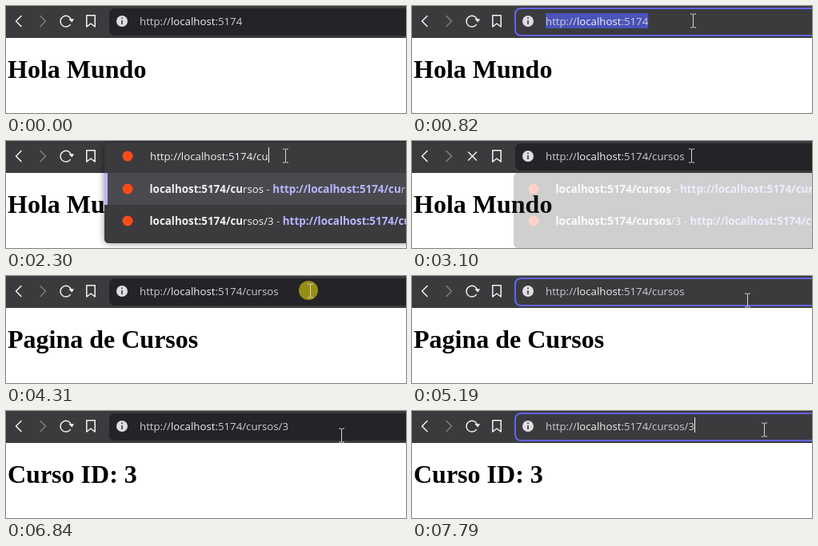
These frames come from a looping animation (500 px wide and 134 px high, 8 s). An HTML page:

```html
<!DOCTYPE html>
<html lang="es">
<head>
<meta charset="utf-8">
<title>Rutas</title>
<style>
  html, body { margin: 0; width: 100%; height: 100%; overflow: hidden; background: #fff; }
  svg { display: block; width: 500px; height: 134px; }
  text { font: 13.25px "Open Sans", "Noto Sans", sans-serif; fill: #f0f0f2; white-space: pre; }
  #title { font: bold 32px "Liberation Serif", Times, serif; fill: #000; }
  .line { fill: none; stroke: #f4f4f6; stroke-width: 1.5; stroke-linecap: round; stroke-linejoin: round; }
  .dim { fill: #cdcdd1; }
  .b { font-weight: 700; font-size: 13.4px; }
  .link { fill: #b9b6ff; }
  .mark { fill: #ff4a1c; }
  #panel { filter: drop-shadow(0 0 4px rgba(0, 0, 0, .45)); }
</style>
</head>
<body>
<svg viewBox="0 0 500 134">
  <text id="title" x="2" y="90"></text>

  <rect width="500" height="40" fill="#3b3b3e"/>
  <path class="line" d="M19 12.5 L12.5 19 L19 25.5"/>
  <path class="line" style="stroke:#8b7d72" d="M43 12.5 L49.5 19 L43 25.5"/>
  <g id="reload">
    <path class="line" d="M81.6 17.5 A6.9 6.9 0 1 0 80.4 23.4"/>
    <path fill="#f4f4f6" d="M78.3 16.2 H85 L82.4 20.4 Z"/>
  </g>
  <path id="stop" class="line" d="M70.5 14 L80.5 24 M80.5 14 L70.5 24"/>
  <path class="line" d="M100.8 11.8 H111.2 V26 L106 22 L100.8 26 Z"/>

  <g id="bar">
    <rect id="field" x="129" y="3" width="390" height="34" rx="7" stroke-width="2"/>
    <circle cx="145" cy="19" r="7" fill="#dedee0"/>
    <path d="M145 18 V23 M145 14.6 V16.2" stroke="#35353a" stroke-width="1.6"/>
    <rect id="select" x="167" y="9" height="19" fill="#4a53b8"/>
    <text id="url" x="167" y="24"></text>
  </g>

  <g id="drop">
    <rect id="panel" width="400" rx="5" fill="#3b3b3e"/>
    <g id="hover">
      <rect x="123" y="40" width="377" height="40" fill="#4a4a4e"/>
      <rect x="123" y="40" width="4" height="40" rx="1" fill="#b9b6ff"/>
    </g>
    <g id="input">
      <circle class="mark" cx="152" cy="19" r="6.5"/>
      <text id="typed" x="180" y="24"></text>
    </g>
    <circle class="mark" cx="152" cy="60" r="6.5"/>
    <text id="row1" x="179.5" y="64.5"></text>
    <circle id="visited" class="mark" cx="152" cy="100" r="6.5"/>
    <path id="lens" class="line" style="stroke:#c8c8cc" d="M153.5 101.5 L157 105 M154.5 98.7 a3.4 3.4 0 1 0 -6.8 0 a3.4 3.4 0 1 0 6.8 0"/>
    <text id="row2" x="179.5" y="104.5"></text>
  </g>

  <rect id="caret" y="8" width="1" height="19" fill="#f4f4f6"/>
  <circle id="pulse" r="12" fill="#fff200"/>
  <g id="mouse">
    <path id="beam" fill="none" stroke="#d6d6d8" d="M-3.5 -8.5 H-1 L0 -7.5 L1 -8.5 H3.5 M-3.5 8.5 H-1 L0 7.5 L1 8.5 H3.5 M0 -7.5 V7.5"/>
    <path id="arrow" fill="#fff" stroke="#000" d="M0 0 V15 L3.5 11.7 L6 17 L8.3 16 L6 11 H10.8 Z"/>
  </g>
</svg>
<script>
const LOOP = 8000;
const HOST = "localhost:5174";
const $ = id => document.getElementById(id);
const el = {};
document.querySelectorAll("[id]").forEach(n => el[n.id] = n);

// Each step list holds [start time, value]; the latest one counts.
const at = (steps, t) => {
  let value = steps[0][1];
  for (const [start, v] of steps) if (t >= start) value = v;
  return value;
};

const titles = [[0, "Hola Mundo"], [3500, "Pagina de Cursos"], [6840, "Curso ID: 3"]];
const paths = [
  [0, ""], [1960, "/"], [2100, "/c"], [2300, "/cu"], [2370, "/cur"], [2510, "/curs"],
  [2640, "/curso"], [2770, "/cursos"], [5450, "/cursos/"], [5910, "/cursos/3"]
];
const panelAlpha = [
  [0, 0], [1960, .5], [2030, 1], [3100, .24], [3170, 0],
  [5450, .6], [5520, 1], [6440, .7], [6510, .24], [6580, 0]
];
const carets = [[0, 0], [1260, 1], [1760, 0], [1960, 1], [3100, 0], [4690, 1], [5190, 0], [5450, 1], [6440, 0], [7720, 1]];
const focus = [[680, 3100], [4380, 6440], [7510, LOOP]];
const selected = [[680, 1260], [4380, 4690], [7510, 7720]];
const typing = [[1960, 3100], [5450, 6440]];
const loading = [[3100, 3500], [6440, 6840]];
const clicks = [610, 1150, 4240, 4480, 7440, 7580];
const moves = [
  [130, 440, 150], [610, 351, 18], [950, 351, 18], [1020, 349, 18], [4030, 349, 18], [4240, 380, 18],
  [4590, 380, 18], [4720, 419, 30], [7370, 419, 30], [7510, 440, 23]
];

const inside = (spans, t) => spans.some(([a, b]) => t >= a && t < b);
const show = (node, on) => node.style.display = on ? "" : "none";
const span = (text, cls) => `<tspan class="${cls}">${text}</tspan>`;

function put(node, html) {
  if (node.markup !== html) node.innerHTML = node.markup = html;
}

function set(node, attrs) {
  for (const name in attrs) node.setAttribute(name, attrs[name]);
}

// The part typed so far is bold.
function suggestion(path, typed) {
  const rest = path.slice(typed.length);
  return span(HOST + typed, "b") + rest + span(" - ", "dim") +
    span("http://" + HOST + typed, "b link") + span(rest, "link");
}

function pointer(t) {
  let i = 0;
  while (i < moves.length - 1 && t >= moves[i + 1][0]) i++;
  const [t0, x0, y0] = moves[i];
  const [t1, x1, y1] = moves[i + 1] || [LOOP, x0, y0];
  const k = Math.max(0, Math.min(1, (t - t0) / (t1 - t0)));
  const e = k * k * (3 - 2 * k);
  return [x0 + (x1 - x0) * e, y0 + (y1 - y0) * e];
}

function drawBar(t, path) {
  const open = inside(typing, t);
  const focused = inside(focus, t);
  put(el.url, span("http://", "dim") + "localhost" + span(":5174" + path, "dim"));
  put(el.typed, "http://" + HOST + path);
  set(el.field, focused
    ? { fill: "#3b3b3e", stroke: "#6664ea" }
    : { fill: "#242328", stroke: "none" });
  show(el.bar, !open);
  show(el.select, inside(selected, t));
  const width = (open ? el.typed : el.url).getComputedTextLength();
  if (!open) set(el.select, { width });
  set(el.caret, { x: Math.round((open ? 180 : 167) + width) });
  show(el.caret, at(carets, t));
}

function drawPanel(t, path) {
  const alpha = at(panelAlpha, t);
  const open = inside(typing, t);
  const search = t >= 5450;
  show(el.drop, alpha > 0);
  el.drop.style.opacity = alpha;
  show(el.input, open);
  show(el.hover, open);
  set(el.panel, open ? { x: 123, y: 2, height: 126 } : { x: 127, y: 40, height: 94 });
  el.panel.style.filter = open ? "" : "none";
  show(el.visited, !search);
  show(el.lens, search);
  put(el.row1, suggestion(search ? "/cursos/3" : "/cursos", path));
  put(el.row2, search
    ? "http://" + HOST + path + span(" - Búsqueda de Tolvia", "dim")
    : suggestion("/cursos/3", path));
}

function drawPointer(t) {
  const [x, y] = pointer(t);
  show(el.mouse, t >= 130);
  set(el.mouse, { transform: `translate(${Math.round(x) + .5} ${Math.round(y) + .5})` });
  show(el.beam, y < 40);
  show(el.arrow, y >= 40);
  const age = Math.min(...clicks.map(c => t >= c ? t - c : LOOP));
  const fade = Math.max(0, Math.min(1, (210 - age) / 110));
  set(el.pulse, { cx: x - 2, cy: y, opacity: .52 * fade });
}

function draw() {
  const t = performance.now() % LOOP;
  const path = at(paths, t);
  put(el.title, at(titles, t));
  show(el.stop, inside(loading, t));
  show(el.reload, !inside(loading, t));
  drawPanel(t, path);
  drawBar(t, path);
  drawPointer(t);
  requestAnimationFrame(draw);
}
draw();
</script>
</body>
</html>
```
